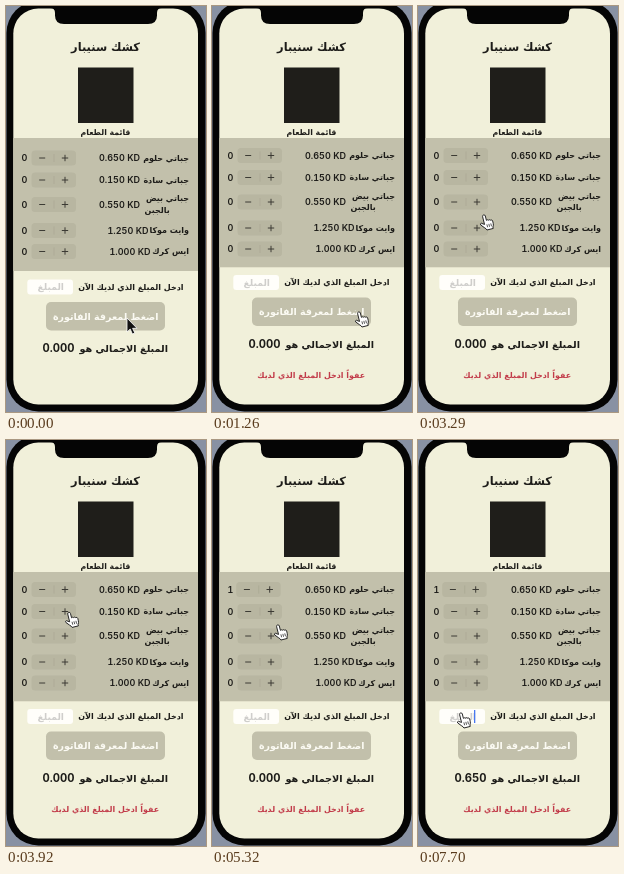
Animation, 200 px wide and 406 px high, one loop 8 s. Source, as an HTML page:

```html
<!DOCTYPE html>
<html lang="ar">
<head>
<meta charset="utf-8">
<style>
  html, body { margin: 0; width: 100%; height: 100%; overflow: hidden; background: #8891a3; }
  svg { display: block; width: 100vw; height: 100vh; }
  text { font: bold 8px "DejaVu Sans", sans-serif; fill: #1d1c19; }
  .ar { direction: rtl; }
  .mid { text-anchor: middle; }
  .num { font: 600 9px Inter, sans-serif; font-variant-numeric: tabular-nums; }
  .end { text-anchor: end; }
</style>
</head>
<body>
<svg viewBox="0 0 200 406">
  <rect x=".5" y="-5" width="199" height="410.5" rx="32" fill="#050505"/>
  <rect x="7.3" y="2.5" width="184.7" height="396" rx="25" fill="#f1f0da"/>
  <path d="M44 2q5 0 5 5v2.5q0 8.5 9 8.5h84q9 0 9-8.5V7q0-5 5-5z" fill="#050505"/>

  <text class="ar mid" x="99.5" y="45" style="font-size:11.4px">كشك سنيبار</text>
  <rect x="72" y="61.5" width="55.5" height="55.5" fill="#1f1e1a"/>
  <text class="ar mid" x="99.5" y="128.7" style="font-size:7.8px">قائمة الطعام</text>

  <rect id="panel" x="7.3" y="132" width="184.7" height="133" fill="#c2c0ab"/>
  <g id="rows"></g>

  <g id="form">
    <text class="ar" x="177.5" y="283.5">ادخل المبلغ الذي لديك الآن</text>
    <rect x="21.3" y="273.5" width="45.7" height="15" rx="3" fill="#fffefa"/>
    <text class="ar" x="58" y="284" style="font-size:9.2px;fill:#cfcecb">المبلغ</text>
    <rect x="40" y="296" width="119" height="28.5" rx="5" fill="#c2c0ab"/>
    <text class="ar mid" x="99.7" y="313.5" style="font-size:9.5px;fill:#fbfaf3">اضغط لمعرفة الفاتورة</text>
    <text class="ar" x="162" y="346" style="font-size:9.7px">المبلغ الاجمالي هو</text>
    <text class="num" id="total" x="36.5" y="346" style="font-size:11.2px;font-weight:700"></text>
  </g>
  <text class="ar mid" id="error" x="99.2" y="372" style="font-size:7.95px;fill:#c23c4a">عفواً ادخل المبلغ الذي لديك</text>
  <rect id="caret" x="56" y="270" width="1.3" height="13" fill="#4878f0"/>

  <path id="arrow" d="M0 0V14l3.2-3 2.2 5 2.4-1-2.2-4.7H10z" fill="#111" stroke="#fff" stroke-width=".8"/>
  <g id="hand">
    <g transform="rotate(-14 7 8)" stroke="#222" stroke-width=".9" stroke-linejoin="round">
      <path fill="#fff" d="M5 10V2a1.4 1.4 0 0 1 2.8 0V6.5q1-.8 2 .3 1.2-.6 2 .5 1.7-.4 1.9 1.2V11q0 2-1.2 3.5V16H6q-.3-1.5-2-3L1.2 9.7q-.7-1.6 1-1.6z"/>
      <path fill="none" stroke-width=".7" d="M7.3 10.5v3m2-3v3m2-3v3"/>
    </g>
  </g>
</svg>
<script>
const $ = id => document.getElementById(id);

// centre, price, price's left edge, lines of the label
const items = [
  [152, '0.650', 93, 'جباتي حلوم'],
  [174, '0.150', 93, 'جباتي سادة'],
  [198.5, '0.550', 93, 'جباتي بيض', 'بالجبن'],
  [224.5, '1.250', 101.5, 'وايت موكا'],
  [245.5, '1.000', 103.5, 'ايس كرك']
];

$('rows').innerHTML = items.map(([y, price, x, name, more], i) => `
  <text class="num" id="count${i}" x="15.5" y="${y + 3}">0</text>
  <g id="stepper${i}">
    <rect x="25.5" y="${y - 7.5}" width="44.5" height="15" rx="3.5" fill="#b8b6a1"/>
    <path d="M48 ${y - 4}v8" stroke="#aaa893" stroke-width=".7"/>
    <path d="M33.2 ${y}h6M55.8 ${y}h6.4m-3.2-3.2v6.4" stroke="#3c3b34" stroke-width="1"/>
  </g>
  <text class="num" x="${x}" y="${y + 3}">${price} KD</text>
  <text class="ar" x="183" y="${more ? y - 3.5 : y + 2.5}">${name}</text>
  ${more ? `<text class="ar end" x="138.5" y="${y + 8}">${more}</text>` : ''}`).join('');

// pointer path: time, x, y
const path = [
  [0, 121, 312], [140, 129, 304], [350, 129, 304], [490, 139, 304], [560, 139, 304],
  [630, 142, 305], [2450, 142, 305], [3290, 61, 208], [3360, 60, 202], [3430, 60, 202],
  [4270, 57, 153], [4410, 57, 148], [4690, 57, 148], [4900, 78, 120], [5180, 58, 157],
  [5250, 58, 157], [5320, 61, 184], [5740, 103, 304], [6510, 103, 304], [7070, 38, 272],
  [8000, 38, 272]
];

const ease = k => k * k * (3 - 2 * k);
const progress = (t, a, b) => ease(Math.min(1, Math.max(0, (t - a) / (b - a))));
const move = (id, x, y) => $(id).setAttribute('transform', `translate(${x} ${y})`);
const show = (id, on) => $(id).setAttribute('opacity', +on);

function pointer(t) {
  const i = path.findIndex(p => p[0] > t);
  const [t0, x0, y0] = path[i - 1], [t1, x1, y1] = path[i];
  const k = progress(t, t0, t1);
  return [x0 + (x1 - x0) * k, y0 + (y1 - y0) * k];
}

function draw(now) {
  let t = now % 8000;
  t -= t % 70;
  const shift = progress(t, 910, 1260);
  move('rows', 0, -2.5 * shift);
  move('form', 0, -4.5 * shift);
  $('panel').setAttribute('height', 133 - 3.7 * shift);
  show('error', shift);

  const added = t >= 4690;
  $('count0').textContent = +added;
  move('stepper0', added ? -1.3 : 0, 0);
  $('total').textContent = t >= 6370 ? '0.650' : '0.000';
  show('caret', t >= 7700);

  const [x, y] = pointer(t), overButton = t >= 630;
  move('arrow', x, y);
  move('hand', x, y);
  show('arrow', !overButton);
  show('hand', overButton);
}

const start = performance.now();
(function loop() {
  draw(performance.now() - start);
  requestAnimationFrame(loop);
})();
</script>
</body>
</html>
```
